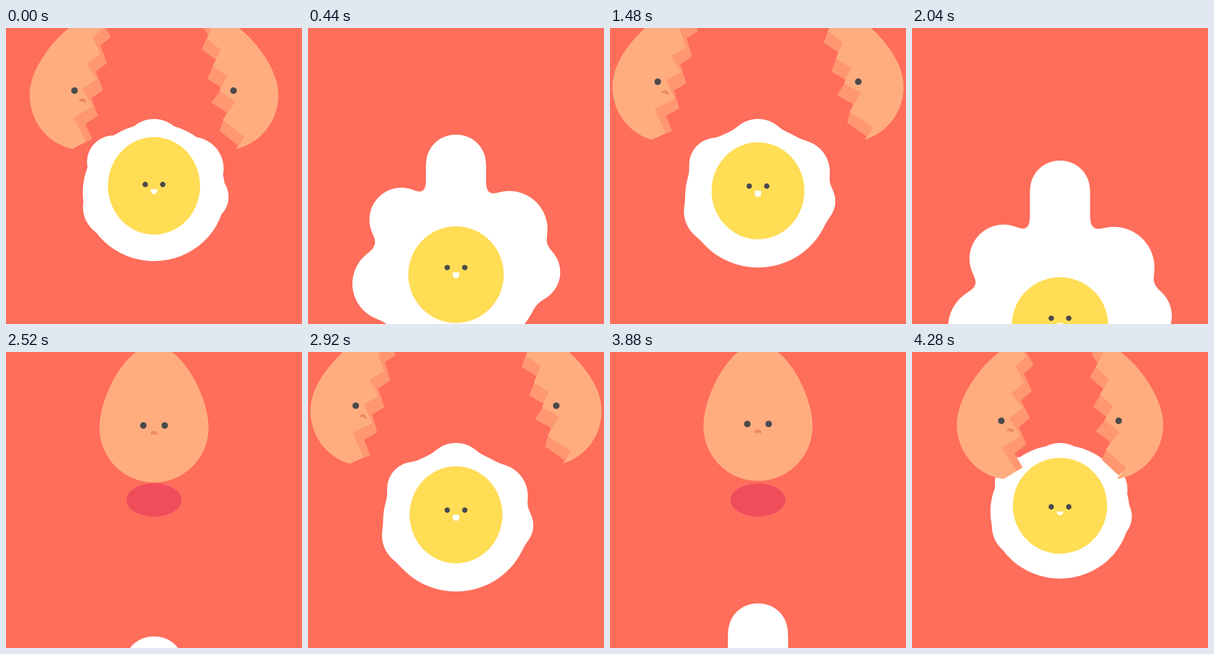
Animation of 540x540 px, one loop 4.32 s. Source, as an HTML page:

```html
<!DOCTYPE html>
<html lang="en">
<head>
<meta charset="utf-8">
<title>Egg drop</title>
<style>
  html, body { margin: 0; width: 100%; height: 100%; overflow: hidden; background: #ff6d5b; }
  svg { display: block; width: 100vw; height: 100vh; }
</style>
</head>
<body>
<svg viewBox="0 0 540 540">
  <defs>
    <filter id="goo" filterUnits="userSpaceOnUse" x="-80" y="-80" width="700" height="780" color-interpolation-filters="sRGB">
      <feGaussianBlur id="blur" stdDeviation="8"/>
      <feColorMatrix id="sharpen" values="0 0 0 0 1  0 0 0 0 1  0 0 0 0 1  0 0 0 20 -9.5"/>
    </filter>
    <path id="shape" d="M99.5 0C99.5 55 55 100 0 100S-99.5 55 -99.5 0C-99.5 -55 -52 -150 0 -150S99.5 -55 99.5 0Z"/>
    <clipPath id="inEgg"><use href="#shape"/></clipPath>
    <circle id="eye" r="6" fill="#4a4a4c"/>
    <path id="frown" d="M-7 13Q-6 6 0 6Q6 6 7 13Q0 11 -7 13Z" fill="#ed8a62"/>
  </defs>
  <rect width="540" height="540" fill="#ff6d5b"/>
  <ellipse id="shadow" cx="270" cy="270" fill="#ef4d5c"/>
  <g id="fried">
    <g id="white" fill="#fff"></g>
    <ellipse id="yolk" cx="270" fill="#ffdd55"/>
    <g id="face">
      <circle cx="-16" r="4.9" fill="#4a4a4c"/>
      <circle cx="16" r="4.9" fill="#4a4a4c"/>
      <path id="smile" fill="#fff"/>
    </g>
  </g>
  <g id="egg">
    <use href="#shape" fill="#ffad7f"/>
    <use href="#eye" x="-19.5" y="-4"/>
    <use href="#eye" x="19.5" y="-4"/>
    <use href="#frown"/>
  </g>
  <g id="left">
    <g clip-path="url(#inEgg)">
      <path fill="#ff9770" d="M-110 -160H-15L0 -137L20 -115L5 -96L25 -67.5L9 -47L31 -18.6L14 1.5L33.6 29.4L15 50L34.6 72.6L25 81L-9 60L-110 40Z"/>
      <path fill="#ffad7f" d="M-110 -160H-20L-14 -150L3 -128L-12 -107L9 -80L-11 -57L14 -34L-6 -11L20 16L-9 44.5L25 81L5 99L4 110H-110Z"/>
    </g>
    <use href="#eye" x="-19.5" y="-4"/>
    <use href="#frown"/>
  </g>
  <g id="right">
    <g clip-path="url(#inEgg)">
      <path fill="#ff9770" d="M110 -160H10L-6 -132L1 -114L-17.4 -91.5L3 -66L-21 -37.6L0 -13L-25.5 6.7L-3 31L-24 60L1 94.4L18 83L110 60Z"/>
      <path fill="#ffad7f" d="M110 -160H0L14 -130L-3 -108L16 -81.5L-5.6 -57.3L14.7 -32.3L-5.7 -10L17.3 17L-13.4 43L17.4 83L-3.4 99.4V110H110Z"/>
    </g>
    <use href="#eye" x="19.5" y="-4"/>
  </g>
</svg>
<script>
const $ = id => document.getElementById(id);
const NS = 'http://www.w3.org/2000/svg';
const STEP = 40, CYCLE = 36;

// lobes of the white: x, y, r, then speed and acceleration in x and in y
const lobes = [
  [193, 249, 48.5, -3.3, 0.206, 4.5, 1.11],
  [343, 262, 58, 4, -0.316, 5.5, 1],
  [365, 316, 46, 5, -0.204, 8, 0.99],
  [192, 335, 57, -5.4, 0.23, 8.5, 0.93]
];

function add(tag) {
  const el = document.createElementNS(NS, tag);
  $('white').appendChild(el);
  return el;
}
const body = add('ellipse');
const column = add('rect');
const blobs = lobes.map(() => add('circle'));

function set(el, attrs) {
  for (const key in attrs) el.setAttribute(key, attrs[key]);
}
function show(el, on) {
  el.setAttribute('visibility', on ? 'visible' : 'hidden');
}
// steady before k = 0, accelerating after it
const travel = (v, a, k) => v * k + (k > 0 ? a * k * k / 2 : 0);

function drawWhite(n) {
  const k = n - 1, grow = Math.min(k, 14), late = Math.max(0, grow);
  const soft = n > 0 ? Math.min(11, 7 + 0.3 * n) : 0;
  const fix = r => r + soft * soft / (2 * r);   // the blur shrinks round shapes a little

  if (soft) {
    const gain = 2.5 * soft;
    set($('white'), { filter: 'url(#goo)' });
    set($('blur'), { stdDeviation: soft });
    set($('sharpen'), { values: `0 0 0 0 1 0 0 0 0 1 0 0 0 0 1 0 0 0 ${gain} ${0.5 - gain / 2}` });
  } else {
    $('white').removeAttribute('filter');
  }

  const cy = 308 + travel(8.3, 1.18, k);
  set(body, {
    cx: 270, cy,
    rx: fix(133 + (k > 0 ? 2.3 : 3) * grow),
    ry: fix(129 + (k > 0 ? 2.2 : 3.5) * grow)
  });

  const drop = Math.max(0, n - 4.6);
  const top = 166 + 0.7035 * drop * drop;
  const extra = fix(55) - 55;
  set(column, {
    x: 215, y: top - extra, width: 110,
    rx: 55 - extra, ry: 53 - extra,
    height: Math.max(110, cy - top)
  });

  blobs.forEach((el, i) => {
    const [x, y, r, vx, ax, vy, ay] = lobes[i];
    set(el, {
      cx: x + travel(vx, ax, grow),
      cy: y + travel(vy, ay, k),
      r: fix(r * (1 + 0.02 * late))
    });
  });
}

function drawYolk(n) {
  const k = n - 1, late = Math.min(1, Math.max(0, k / 14));
  const cy = k > 0 ? 297 + travel(9.7, 1.12, k) : 288 + 8.25 * n + 0.75 * n * n;
  const rx = k >= 0 ? 84.7 + 3.3 * late : 84 - 2 * n;
  const ry = k >= 0 ? 88.5 - 0.5 * late : 89 + 1.5 * n;
  set($('yolk'), { cy, rx, ry });

  const lag = k > 0 ? -13 + 4.5 * Math.exp(-k / 2) : -2.5 - 5.25 * n - 0.75 * n * n;
  set($('face'), { transform: `translate(270 ${cy + lag})` });
  const open = Math.min(5, Math.max(0.5, 3 + 2.3 * n));
  set($('smile'), { d: `M-6 8.6H6v${open}a6 6 0 0 1 -12 0Z` });
}

function drawFried(n) {
  show($('fried'), n > -4);
  if (n <= -4) return;
  const early = Math.max(0, -1 - n) / 3, s = 1 - early * early;
  set($('fried'), { transform: `translate(270 166) scale(${s}) translate(-270 -166)` });
  drawWhite(n);
  drawYolk(n);
}

function drawShell(n) {
  const whole = n < -3.3, apart = !whole && n < 13;
  const rest = 1 - Math.min(1, Math.max(0, (n + 19) / 10));
  const arrive = rest ** 3;
  show($('egg'), whole && n > -19);
  show($('left'), apart);
  show($('right'), apart);
  show($('shadow'), n > -19 && n < -1);

  set($('egg'), { transform: `translate(270 ${138 - 355 * arrive})` });
  set($('shadow'), { rx: 50.3 * (1 - arrive), ry: 30.4 * (1 - arrive) });
  if (!apart) return;

  const k = n - 1;
  const x = k > 0 ? 166 + 39 * k - 1.5 * k * k : 127.2 + 38.6 * n;
  const y = k > 0 ? 108 - 16 * k : n > -2.5 ? 123 - 12.5 * n - 2.5 * n * n : 138;
  const turn = k > 0 ? 18.9 + 3 * k : Math.max(0, 14.8 + 4.1 * n);
  set($('left'), { transform: `translate(${270 - x} ${y}) rotate(${turn})` });
  set($('right'), { transform: `translate(${270 + x} ${y}) rotate(${-turn})` });
}

const start = performance.now();
function frame(now) {
  const p = Math.floor(Math.max(0, now - start) / STEP) % CYCLE;
  drawFried(p > 30 ? p - CYCLE : p);
  drawShell(p > 15 ? p - CYCLE : p);
  requestAnimationFrame(frame);
}
frame(start);
</script>
</body>
</html>
```
